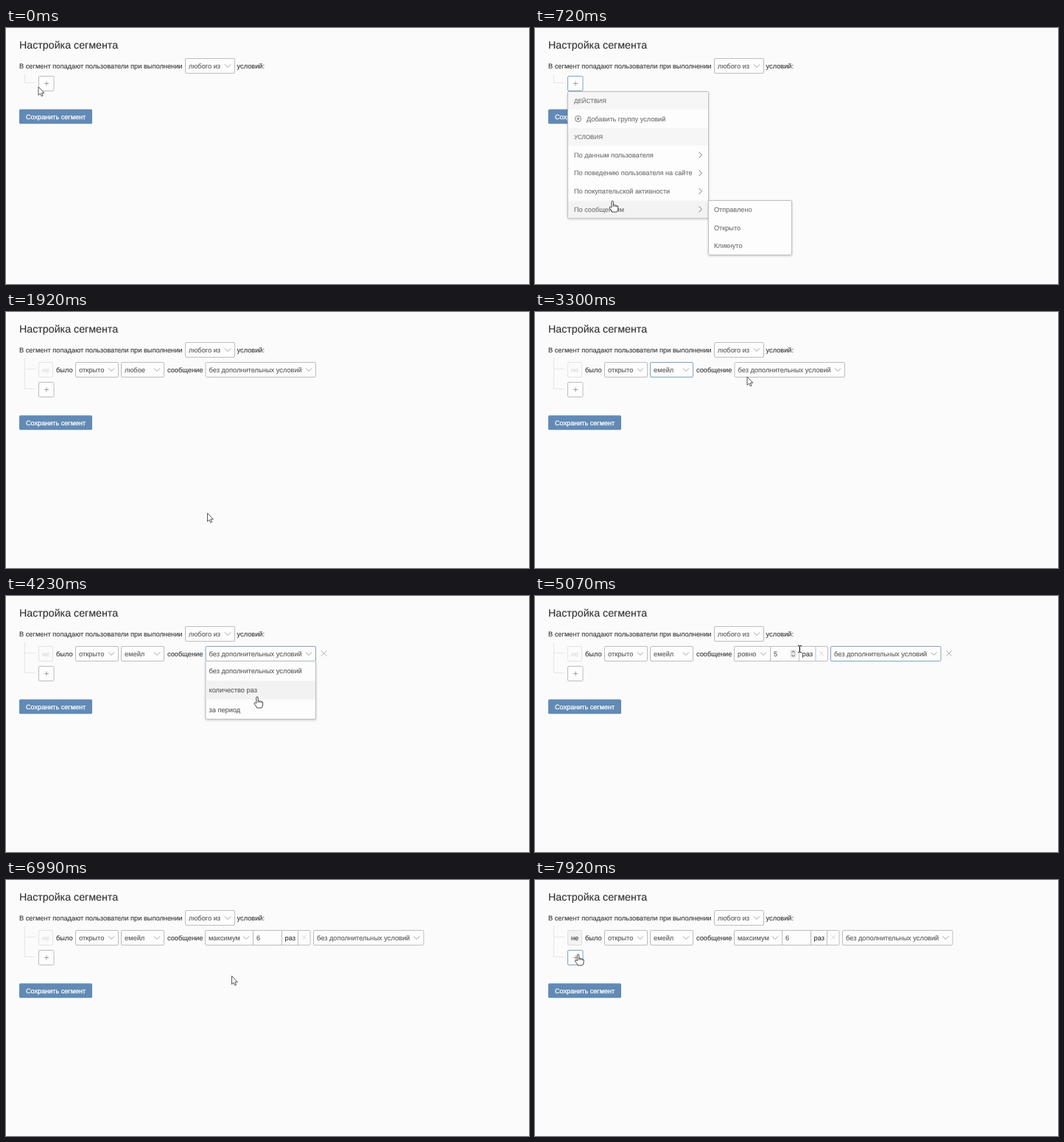
Recreate the animation shown at these times as an HTML page. Size 710 by 348 pixels, loop 8 s.

```html
<!DOCTYPE html>
<html lang="ru">
<head>
<meta charset="utf-8">
<title>Настройка сегмента</title>
<style>
html, body { margin: 0; width: 100%; height: 100%; overflow: hidden; background: #fbfbfb; }
svg { display: block; width: 710px; height: 348px; }
text { font-family: "Liberation Sans", Arial, sans-serif; text-rendering: geometricPrecision; }
.shadow { filter: drop-shadow(0 1px 1.5px rgba(0, 0, 0, .2)); }
</style>
</head>
<body>
<svg id="stage" viewBox="0 0 710 348"></svg>
<script>
const LOOP = 8000, STEP = 30;
const stage = document.getElementById('stage');
const DARK = '#383838', MID = '#5c5c5c', SOFT = '#707070';
const EDGE = '#bdbdbd', BLUE = '#84a2bd', FAINT = '#e3e3e3';

// Moments at which the interface changes
const AT = {
  menu: 210, sub: 720, row: 1800,
  typeOpen: 2430, typePick: 3180,
  condOpen: 3540, condPick: 4680,
  plusOne: 5460, cmpOpen: 5760, cmpPick: 6900,
  negate: 7500, plus: 7830
};

// Pointer route: time, x, y
const route = [
  [30, 44, 80], [150, 54, 77], [210, 54, 77], [450, 100, 215], [630, 100, 215],
  [780, 108, 246], [1050, 250, 246], [1260, 250, 246], [1500, 271.5, 257],
  [1680, 273.5, 273.5], [1920, 273.5, 273.5], [2040, 246, 185], [2330, 190, 80],
  [2480, 190, 80], [2790, 186, 128], [2880, 186, 128], [3000, 188, 121],
  [3180, 188, 121], [3300, 288, 88], [3480, 345, 80], [3570, 345, 80],
  [3780, 344, 134], [4050, 344, 134], [4410, 338, 140], [4680, 338, 140],
  [5070, 359.5, 72], [5280, 359.5, 72], [5400, 350, 75], [5520, 350, 75],
  [5730, 298, 80], [5790, 298, 80], [6060, 302, 144], [6120, 302, 144],
  [6480, 306.5, 130.5], [6990, 306.5, 130.5], [7440, 54, 79], [7620, 54, 79],
  [7830, 58.5, 101]
];

const kinds = [
  [0, 'arrow'], [90, 'hand'], [1800, 'arrow'], [2250, 'hand'], [3180, 'arrow'],
  [3390, 'hand'], [4680, 'arrow'], [4890, 'beam'], [5370, 'arrow'], [5640, 'hand'],
  [6900, 'arrow'], [7350, 'hand']
];

const shapes = {
  arrow: '<path d="M0 0V11.4L2.6 9L4.3 12.8L6 12.1L4.4 8.3H7.8Z" fill="#fff" stroke="#444" stroke-width=".9"/>',
  hand: '<path d="M-1.2 9V1.2A1.2 1.2 0 0 1 1.2 1.2V5.5Q2.4 4.8 3.4 6Q4.8 5.3 5.7 6.6Q7.6 6.2 7.6 8V11Q7.4 13 6 15H-.5Q-1 13-3.5 10.2Q-4.8 8.6-3.4 8Q-2.4 7.6-1.2 9ZM1.2 5.5V8M3.4 6V8M5.7 6.6V8.4" fill="#fff" stroke="#333" stroke-width=".9"/>',
  beam: '<path d="M-2.5-4.5H-.7L0-4L.7-4.5H2.5M0-4V4M-2.5 4.5H-.7L0 4L.7 4.5H2.5" fill="none" stroke="#222"/>'
};

const between = (t, a, b) => t >= a && t < b;

function pointer(t) {
  if (t <= route[0][0]) return route[0].slice(1);
  const i = route.findIndex(p => p[0] > t);
  if (i < 0) return route[route.length - 1].slice(1);
  const [t0, x0, y0] = route[i - 1], [t1, x1, y1] = route[i];
  const k = (t - t0) / (t1 - t0), e = k * k * (3 - 2 * k);
  return [x0 + (x1 - x0) * e, y0 + (y1 - y0) * e];
}

// A thin stroke sets the weight of the type
const text = (x, y, s, fill = DARK, size = 9.25, weight = .12) =>
  `<text x="${x}" y="${y}" font-size="${size}" fill="${fill}" stroke="${fill}" stroke-width="${weight}">${s}</text>`;

const box = (x, y, w, h, stroke = EDGE, fill = '#fdfdfd', r = 1.5) =>
  `<rect x="${x}" y="${y}" width="${w}" height="${h}" rx="${r}" fill="${fill}" stroke="${stroke}"/>`;

const line = (d, stroke, extra = '') => `<path d="${d}" fill="none" stroke="${stroke}" ${extra}/>`;

const cross = (x, y, r, c) =>
  line(`M${x - r} ${y - r}L${x + r} ${y + r}M${x + r} ${y - r}L${x - r} ${y + r}`, c, 'stroke-width=".9"');

const chevron = (x, y) => line(`M${x - 4} ${y - 2}l4 4l4-4`, '#a0a0a0');

function select(x, y, w, label, focus) {
  return box(x, y, w, 20, focus ? BLUE : EDGE) +
    text(x + 4.5, y + 13, label, MID) + chevron(x + w - 9.5, y + 10);
}

function popup(x, w, items, pitch, py) {
  const y = 88.5;
  return `<g class="shadow">${box(x, y, w, pitch * items.length)}</g>` + items.map((s, i) => {
    const top = y + i * pitch;
    const bg = between(py, top, top + pitch)
      ? `<rect x="${x + .5}" y="${top + .5}" width="${w - 1}" height="${pitch - 1}" fill="#f2f2f2"/>` : '';
    return bg + text(x + 4.5, top + pitch / 2 + 3.3, s, MID);
  }).join('');
}

function header() {
  return text(18, 28, 'Настройка сегмента', '#333', 14.24) +
    text(18, 54.8, 'В сегмент попадают пользователи при выполнении') +
    select(243.5, 41.5, 67, 'любого из') +
    text(313.5, 54.8, 'условий:');
}

function tree(t) {
  const d = t < AT.row ? 'M25.5 63V74.5H40' : 'M25.5 63V104.5H40M25.5 77.5H40';
  return line(d, '#dedede', 'stroke-dasharray="1.5 .5"');
}

function plusButton(t) {
  const y = t < AT.row ? 65.5 : 95.5;
  const on = between(t, AT.menu, AT.row) || t >= AT.plus;
  return box(44.5, y, 20.5, 20, on ? BLUE : EDGE) +
    line(`M52 ${y + 10}h6M55 ${y + 7}v6`, '#a0a0a0');
}

function saveButton(t) {
  const y = t < AT.row ? 110.5 : 140.5;
  return `<rect x="18" y="${y}" width="99" height="19.7" rx="1.5" fill="#628ab5"/>` +
    text(27, y + 13, 'Сохранить сегмент', '#fff', 9.1, .28);
}

function menu(t, py) {
  const labels = ['ДЕЙСТВИЯ', 'Добавить группу условий', 'УСЛОВИЯ', 'По данным пользователя',
    'По поведению пользователя на сайте', 'По покупательской активности', 'По сообщениям'];
  const pitch = 24.6;
  let out = `<g class="shadow">${box(44.5, 86.5, 191, 172, '#bcbfc4')}</g>`;
  labels.forEach((s, i) => {
    const top = 86.5 + i * pitch, mid = top + 12.3, head = i === 0 || i === 2;
    const hot = t >= AT.sub ? i === 6 : !head && between(py, top, top + pitch);
    if (head || hot)
      out += `<rect x="45" y="${top + .5}" width="190" height="${pitch - 1}" fill="${hot ? '#f3f3f3' : '#f7f6f6'}"/>`;
    out += text(i === 1 ? 70 : 53, mid + 3.2, s, SOFT, head ? 8 : 9.15);
    if (i === 1)
      out += `<circle cx="58.5" cy="${mid}" r="4" fill="none" stroke="#777"/>` +
        line(`M56.5 ${mid}h4M58.5 ${mid - 2}v4`, '#777');
    if (i > 2) out += line(`M222.5 ${mid - 4}l4 4l-4 4`, '#777');
  });
  return out;
}

function submenu(px, py) {
  let out = `<g class="shadow">${box(235.5, 234.5, 113, 74, '#bcbfc4')}</g>`;
  ['Отправлено', 'Открыто', 'Кликнуто'].forEach((s, i) => {
    const top = 234.5 + i * 24.6;
    if (px > 235 && between(py, top, top + 24.6))
      out += `<rect x="236" y="${top + .5}" width="112" height="24" fill="#f6f5f4"/>`;
    out += text(243, top + 15.7, s, SOFT, 9.15);
  });
  return out;
}

function counter(t) {
  const wide = t >= AT.cmpPick, x = wide ? 335.5 : 319.5;
  const mid = wide ? 22 : 22.5;
  const end = x + 39 + mid + 16.5;
  let out = box(270.5, 68.5, end - 270.5, 20) +
    text(275, 81.5, wide ? 'максимум' : 'ровно', MID) + chevron(x - 9.5, 78.5) +
    line(`M${x} 68.5v20M${x + 39} 68.5v20M${x + 39 + mid} 68.5v20`, EDGE) +
    text(x + 4.5, 81.5, t >= AT.plusOne ? 6 : 5, MID) +
    text(x + 43, 81.5, 'раз') + cross(x + 69.5, 78, 3, '#d5d5d5');
  if (between(t, 4860, 5610))
    out += '<rect x="346.5" y="73" width="8" height="11" rx="1.5" fill="#e4e4e4"/>' +
      line('M348.5 76.8l2-2l2 2M348.5 80.2l2 2l2-2', '#555');
  if (between(t, 5400, AT.cmpOpen)) out += box(x, 68.5, 39, 20, BLUE, 'none', 0);
  if (between(t, AT.cmpOpen, AT.cmpPick)) out += box(270.5, 68.5, 49, 20, BLUE, 'none');
  return out;
}

function conditions(t, py) {
  const neg = t >= AT.negate;
  const popupOpen = between(t, AT.typeOpen, AT.typePick) ||
    between(t, AT.condOpen, AT.condPick) || between(t, AT.cmpOpen, AT.cmpPick);
  const x = t < AT.condPick ? 271 : t < AT.cmpPick ? 401.5 : 417.5;
  const w = 149.5;

  let out = box(44.5, 68.5, 19, 20, neg ? '#dcdcdc' : FAINT, neg ? '#f3f3f3' : '#fbfbfb') +
    text(49, 81.5, 'не', neg ? DARK : '#dadada') +
    text(68, 81.5, 'было') +
    select(94.5, 68.5, 58, 'открыто') +
    select(156.5, 68.5, 58, t < AT.typePick ? 'любое' : 'емейл', between(t, AT.typeOpen, AT.condOpen)) +
    text(219, 81.5, 'сообщение');
  if (t >= AT.condPick) out += counter(t);
  out += select(x, 68.5, w, 'без дополнительных условий', between(t, AT.condOpen, 5400));

  if (popupOpen || between(py, 66, 88)) out += cross(x + w + 11, 78, 3.7, '#aaa');
  return out;
}

function popups(t, py) {
  if (between(t, AT.typeOpen, AT.typePick))
    return popup(156.5, 58, ['любое', 'емейл', 'пуш'], 22, py);
  if (between(t, AT.condOpen, AT.condPick))
    return popup(271, 149.5, ['без дополнительных условий', 'количество раз', 'за период'], 26.3, py);
  if (between(t, AT.cmpOpen, AT.cmpPick))
    return popup(270.5, 65, ['ровно', 'максимум', 'минимум'], 22, py);
  return '';
}

function draw(t) {
  const [px, py] = pointer(t);
  const kind = kinds.filter(k => k[0] <= t).pop()[1];
  let out = '<rect width="710" height="348" fill="#fbfbfb"/>' +
    header() + tree(t) + plusButton(t) + saveButton(t);
  if (t >= AT.row) out += conditions(t, py) + popups(t, py);
  else {
    if (t >= AT.menu) out += menu(t, py);
    if (t >= AT.sub) out += submenu(px, py);
  }
  stage.innerHTML = out + `<g transform="translate(${px} ${py})">${shapes[kind]}</g>`;
}

const start = performance.now();
let last = -1;
function tick() {
  const t = Math.floor((performance.now() - start) % LOOP / STEP) * STEP;
  if (t !== last) draw(last = t);
  requestAnimationFrame(tick);
}
tick();
</script>
</body>
</html>
```
